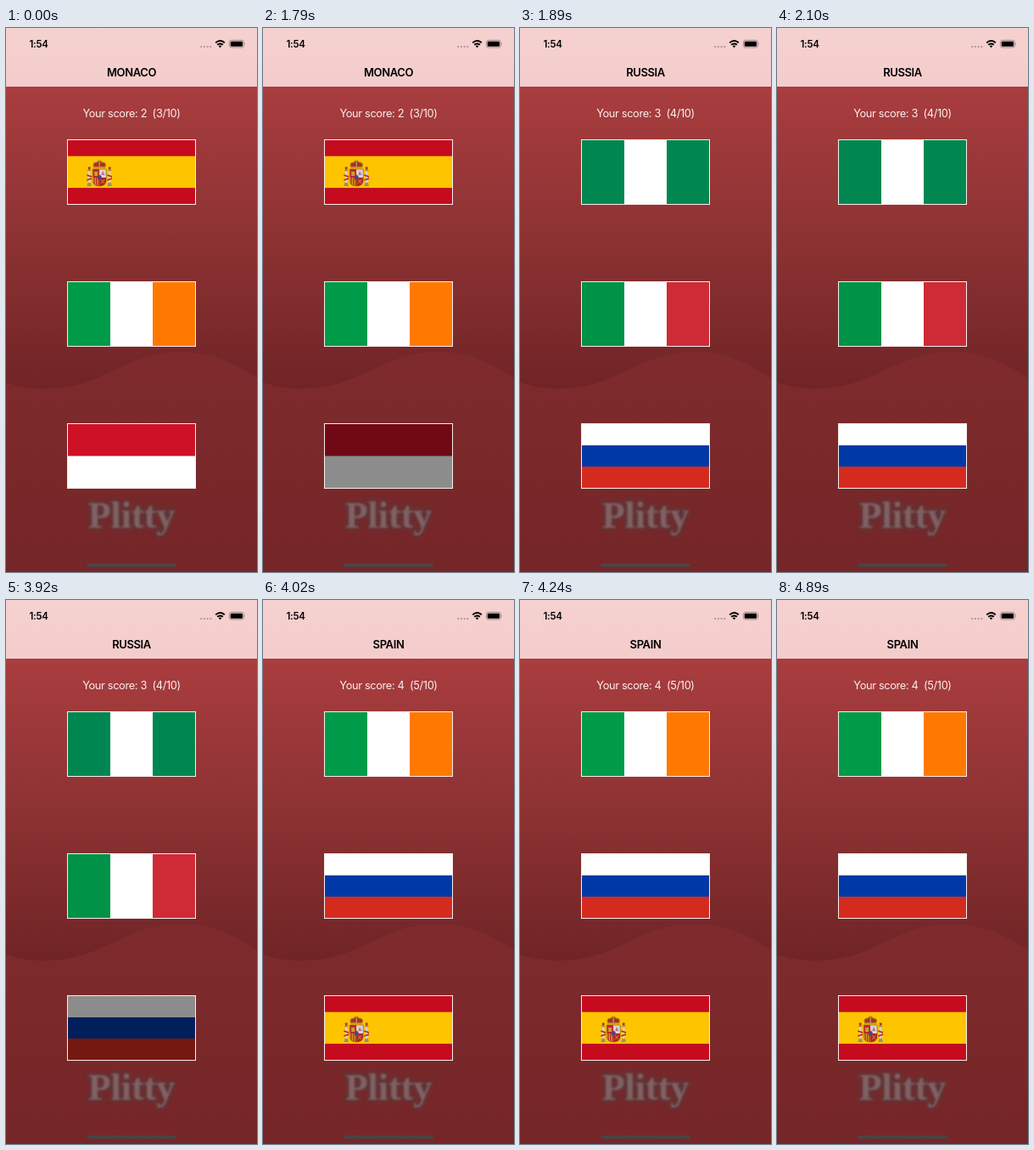
An HTML page that plays this animation: 296x640 px, repeating every 4940 ms.

```html
<!DOCTYPE html>
<html lang="en">
<head>
<meta charset="utf-8">
<title>Flag quiz</title>
<style>
  html, body { margin: 0; width: 100%; height: 100%; overflow: hidden; background: #752526; }
  #stage { position: absolute; left: 0; top: 0; width: 296px; height: 640px; }
  svg { display: block; }
  text { font-family: Inter, "Liberation Sans", sans-serif; white-space: pre; }
  .time { font-size: 11.4px; font-weight: 600; letter-spacing: -.2px; }
  .title { font-size: 13px; font-weight: 600; letter-spacing: -.38px; text-anchor: middle; }
  .score { font-size: 12.8px; letter-spacing: -.35px; text-anchor: middle; fill: #fbf0ef; }
  .brand { font: 700 44px "Liberation Serif", serif; text-anchor: middle; }
</style>
</head>
<body>
<div id="stage">
<svg width="296" height="640" viewBox="0 0 296 640">
  <defs>
    <linearGradient id="sky" gradientUnits="userSpaceOnUse" x1="0" y1="69" x2="0" y2="425">
      <stop offset="0" stop-color="#a93d3f"/>
      <stop offset=".5" stop-color="#8d3233"/>
      <stop offset="1" stop-color="#702426"/>
    </linearGradient>
    <linearGradient id="hill" gradientUnits="userSpaceOnUse" x1="0" y1="380" x2="0" y2="640">
      <stop offset="0" stop-color="#7f2b2d"/>
      <stop offset="1" stop-color="#752628"/>
    </linearGradient>
    <linearGradient id="bar" x1="0" y1="0" x2="0" y2="1">
      <stop offset="0" stop-color="#f5d1d0"/>
      <stop offset="1" stop-color="#f3cdcc"/>
    </linearGradient>
    <filter id="soft" x="-20%" y="-40%" width="140%" height="180%"><feGaussianBlur stdDeviation="1"/></filter>
    <filter id="halo" x="-20%" y="-40%" width="140%" height="180%"><feGaussianBlur stdDeviation="2.6"/></filter>

    <g id="pillar">
      <rect x="-1.2" y="-8" width="2.4" height="14" fill="#d9d2c4"/>
      <rect x="-2" y="-9.5" width="4" height="1.8" fill="#b58a2c"/>
      <rect x="-2" y="6" width="4" height="1.8" fill="#b58a2c"/>
      <rect x="-2.4" y="8" width="4.8" height="2" fill="#6f8fae"/>
      <path d="M-1.6-12.5h3.2l-.5 3h-2.2z" fill="#a3372b"/>
      <path d="M-2.8-3L2.8-1M-2.8 3L2.8 1" stroke="#b4202a" stroke-width="1.6"/>
    </g>
    <g id="arms">
      <use href="#pillar" x="-12" y="5"/>
      <use href="#pillar" x="12" y="5"/>
      <path d="M-6.5-7Q-9-13-3-13Q0-17 3-13Q9-13 6.5-7Z" fill="#a8322b" stroke="#a67b22" stroke-width="1.1"/>
      <path d="M-6.5-7H6.5M0-16V-8" stroke="#c39a35" stroke-width="1.3"/>
      <clipPath id="shield"><path d="M-8-5H8V8Q8 15 0 15Q-8 15-8 8Z"/></clipPath>
      <g clip-path="url(#shield)">
        <rect x="-8" y="-5" width="8" height="10" fill="#c0272d"/>
        <rect y="-5" width="8" height="10" fill="#dcd2d6"/>
        <rect x="-8" y="5" width="8" height="11" fill="#d9a520"/>
        <rect y="5" width="8" height="11" fill="#b3212b"/>
        <path d="M-6 3V-2H-2V3Z" fill="#c9a033"/>
        <path d="M2 2L4-3L6 2Z" fill="#a9749a"/>
        <path d="M-6 5V16M-3.5 5V16M-1 5V16" stroke="#b3212b" stroke-width="1.2"/>
        <path d="M2 7L6 12M6 7L2 12" stroke="#cfa035" stroke-width=".8"/>
        <ellipse cy="5" rx="2.2" ry="2.8" fill="#2c4f96" stroke="#a8322b" stroke-width=".8"/>
      </g>
      <path d="M-8-5H8V8Q8 15 0 15Q-8 15-8 8Z" fill="none" stroke="#7d4a28" stroke-width=".6"/>
    </g>
  </defs>

  <rect width="296" height="640" fill="url(#sky)"/>
  <path d="M0 417C20 424 40 426 66 423C118 417 148 381 205 381C244 381 272 396 296 412V640H0Z" fill="url(#hill)"/>

  <text class="brand" x="148" y="588" fill="#4c4142" stroke="#4c4142" stroke-width="3" opacity=".75" filter="url(#halo)">Plitty</text>
  <text class="brand" x="148" y="588" fill="#927274" opacity=".7" filter="url(#soft)">Plitty</text>
  <rect x="95" y="630" width="106" height="4" rx="2" fill="#4d4344"/>

  <rect width="296" height="69" fill="url(#bar)"/>
  <text class="time" x="27.5" y="23">1:54</text>
  <g fill="#a99192">
    <circle cx="230.2" cy="22" r="1.1"/><circle cx="233.9" cy="22" r="1.1"/>
    <circle cx="237.6" cy="22" r="1.1"/><circle cx="241.3" cy="22" r="1.1"/>
  </g>
  <g fill="none" stroke="#000" stroke-width="1.9">
    <path d="M247.2 17.4Q252.5 12.8 257.8 17.4"/>
    <path d="M249.2 19.8Q252.5 17 255.8 19.8"/>
  </g>
  <path d="M250.7 21.2Q252.5 19.9 254.3 21.2L252.5 23.2Z"/>
  <rect x="263.4" y="14.4" width="17" height="8.6" rx="2.4" fill="none" stroke="#8f7b7b" stroke-width=".8"/>
  <rect x="264.7" y="15.7" width="14.4" height="6" rx="1.3"/>
  <path d="M281.3 17.3Q282.6 18.7 281.3 20.1Z" fill="#8f7b7b"/>

  <g id="rounds"></g>
</svg>
</div>
<script>
const LOOP = 4940;
const W = 150, H = 75, LEFT = 73, TOP = 132, GAP = 167;

// dir: v = vertical bands, h = horizontal bands; parts are relative sizes
const FLAGS = {
  spain:   { dir: 'h', colors: ['#c60b1e', '#ffc400', '#c60b1e'], parts: [1, 2, 1], arms: true },
  ireland: { dir: 'v', colors: ['#009b48', '#fff', '#ff7900'] },
  monaco:  { dir: 'h', colors: ['#ce1126', '#fff'] },
  nigeria: { dir: 'v', colors: ['#008751', '#fff', '#008751'] },
  italy:   { dir: 'v', colors: ['#009246', '#fff', '#ce2b37'] },
  russia:  { dir: 'h', colors: ['#fff', '#0039a6', '#d52b1e'] }
};

const ROUNDS = [
  { title: 'MONACO', score: 'Your score: 2  (3/10)', flags: ['spain', 'ireland', 'monaco'], from: 0, press: 1790 },
  { title: 'RUSSIA', score: 'Your score: 3  (4/10)', flags: ['nigeria', 'italy', 'russia'], from: 1890, press: 3920 },
  { title: 'SPAIN', score: 'Your score: 4  (5/10)', flags: ['ireland', 'russia', 'spain'], from: 4020, press: Infinity }
];

function make(parent, tag, attrs, text) {
  const el = document.createElementNS('http://www.w3.org/2000/svg', tag);
  for (const key in attrs) el.setAttribute(key, attrs[key]);
  if (text) el.textContent = text;
  return parent.appendChild(el);
}

function drawFlag(parent, name, row) {
  const { dir, colors, parts = colors.map(() => 1), arms } = FLAGS[name];
  const g = make(parent, 'g', { transform: `translate(${LEFT} ${TOP + row * GAP})` });
  const total = parts.reduce((a, b) => a + b);
  let pos = 0;
  colors.forEach((fill, i) => {
    const a = pos / total, size = parts[i] / total;
    make(g, 'rect', dir === 'h'
      ? { y: a * H, width: W, height: size * H, fill }
      : { x: a * W, width: size * W, height: H, fill });
    pos += parts[i];
  });
  if (arms) make(g, 'use', { href: '#arms', x: 37.2, y: 39 });
  const shade = make(g, 'rect', { width: W, height: H, fill: '#000', opacity: 0 });
  make(g, 'rect', { x: -.5, y: -.5, width: W + 1, height: H + 1, fill: 'none', stroke: '#f8eeee' });
  return shade;
}

const root = document.getElementById('rounds');
for (const round of ROUNDS) {
  round.el = make(root, 'g', {});
  make(round.el, 'text', { class: 'title', x: 148, y: 57 }, round.title);
  make(round.el, 'text', { class: 'score', x: 148, y: 105 }, round.score);
  round.shade = round.flags.map((name, row) => drawFlag(round.el, name, row)).pop();
}

function draw() {
  const t = performance.now() % LOOP;
  ROUNDS.forEach((round, i) => {
    const end = i + 1 < ROUNDS.length ? ROUNDS[i + 1].from : LOOP;
    round.el.style.display = t >= round.from && t < end ? '' : 'none';
    round.shade.setAttribute('opacity', t >= round.press ? .45 : 0);
  });
  requestAnimationFrame(draw);
}
draw();
</script>
</body>
</html>
```
